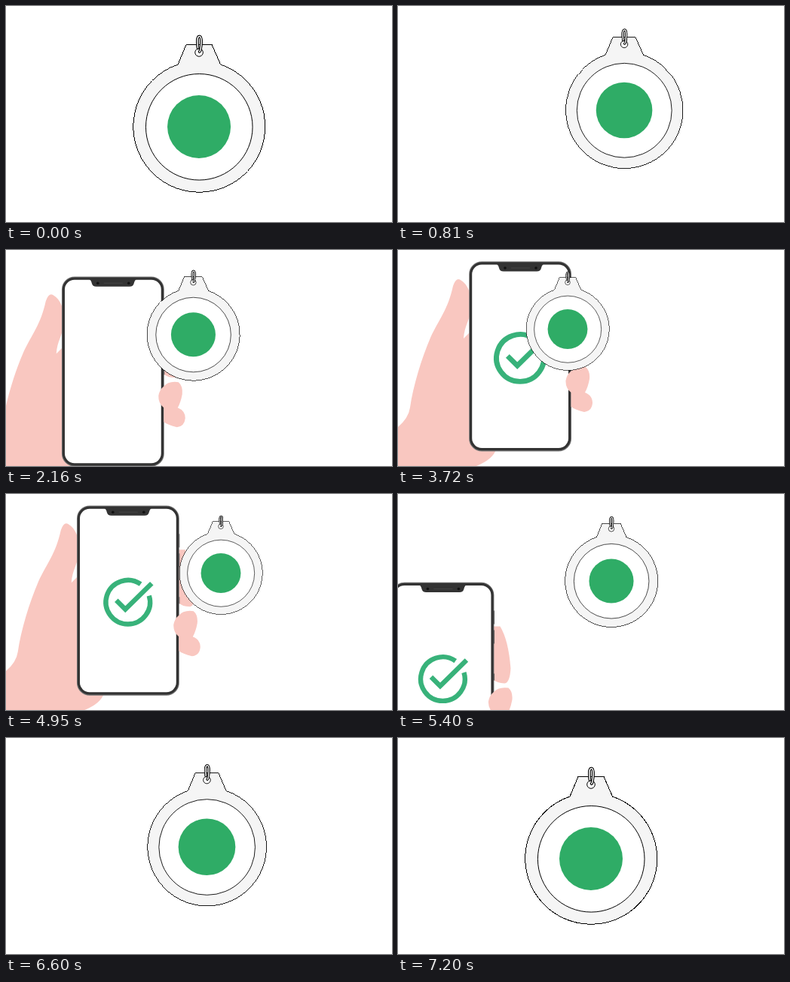
Animation, 512 px wide and 288 px high, one loop 8100 ms. Source, as an HTML page:

```html
<!DOCTYPE html>
<html lang="en">
<head>
<meta charset="utf-8">
<title>Tag and phone</title>
<style>
  html, body { margin: 0; width: 100%; height: 100%; overflow: hidden; background: #fff; }
  svg { display: block; width: 100%; height: 100%; }
</style>
</head>
<body>
<svg viewBox="0 0 512 288">
  <g id="phone">
    <g fill="#f9c7c0">
      <path d="M-310 620 L-60 300 L0 236 Q14 224 16 210 C20 182 31 145 43 117 C55 91 66 80 73 48 Q77 36 83 40 C94 46 98 62 97 78 C96 92 88 101 87 118 L95 110 L130 266 Q126 279 104 288 L0 620 Z"/>
      <path d="M226 74 H238 Q249 92 252 130 Q251 149 244 150 Q234 150 226 143 Z"/>
    </g>
    <path d="M229.5 53 V71 M229.5 79 V97 M229.5 137 V146" stroke="#333" stroke-width="2"/>
    <rect x="95.2" y="16.2" width="133.8" height="251.3" rx="16" fill="#fff" stroke="#777" stroke-width="2"/>
    <rect x="96.6" y="17.8" width="131" height="247.8" rx="14.5" fill="none" stroke="#333" stroke-width="3.2"/>
    <path d="M129 18 H195 Q191 19 190 24 Q189 28.5 184 28.5 H140 Q135 28.5 134 24 Q133 19 129 18 Z" fill="#333"/>
    <g fill="#111"><circle cx="142" cy="24" r="1.8"/><circle cx="183" cy="24" r="1.8"/></g>
    <path d="M150 24 H175" stroke="#444"/>
    <path d="M229 162 Q236 154 249 156 Q255 161 254 172 Q252 183 248 190 Q258 194 258 204 Q257 215 247 216 Q235 213 229.5 209 V190 Q222 184 222.5 174 Q224 166 229 162 Z" fill="#f9c7c0"/>
    <g id="check" fill="none" stroke="#38b27a" stroke-width="6.4">
      <path d="M190 135.4 A29.3 29.3 0 1 1 178.8 120"/>
      <path d="M146.5 141.5 L158.5 153.5 L193.5 119"/>
    </g>
  </g>
  <g id="tag" stroke="#000" fill="#f5f5f5">
    <path d="M-28 -83 L-17 -109.5 H17 L28.5 -83 A87.5 87.5 0 1 1 -28 -83 Z" shape-rendering="crispEdges"/>
    <circle cx=".2" cy=".3" r="70.8" fill="#fff"/>
    <circle r="42" fill="#2fac66" stroke="none"/>
    <circle cy="-99" r="5.3" fill="#fff"/>
    <g id="hook" fill="none" stroke-linecap="round">
      <path id="wire" d="M-1.5 -105 C-2.8 -114 -2.5 -120.5 .6 -120.5 C3.6 -120.5 3.2 -112 2.4 -106 Q2 -101 .6 -100" stroke-width="3.4"/>
      <use href="#wire"/>
      <path d="M-1.5 -105 C-2.8 -114 -2.5 -120.5 .6 -120.5 C3.6 -120.5 3.2 -112 2.4 -106 Q2 -101 .6 -100" stroke="#fff" stroke-width="1.5"/>
    </g>
  </g>
</svg>
<script>
const LOOP = 8100;
const [phone, check, tag] = ['phone', 'check', 'tag'].map(id => document.getElementById(id));

// Each path is a list of [time, x, y]
const approach = [[0, 256, 161], [810, 300, 139], [1180, 326, 127], [1680, 295, 118],
                  [2160, 248.5, 112.8], [2520, 227, 108], [2700, 225, 105.5]];
const retreat = [[4950, 285, 105.5], [5400, 283, 116], [6000, 275.5, 130.5],
                 [6630, 266, 146], [7200, 256, 161]];

function ramp(t, t0, t1, from, to) {
  const u = Math.min(1, Math.max(0, (t - t0) / (t1 - t0)));
  return from + (to - from) * u;
}

// Cubic Hermite curve through the points, slopes taken from the neighbours
function along(points, t) {
  const last = points.length - 1;
  t = Math.min(points[last][0], Math.max(points[0][0], t));
  let i = 0;
  while (i < last - 1 && t > points[i + 1][0]) i++;
  const a = points[i], b = points[i + 1], span = b[0] - a[0], u = (t - a[0]) / span;
  const slope = (k, axis) => {
    const p = points[Math.max(0, k - 1)], q = points[Math.min(last, k + 1)];
    return (q[axis] - p[axis]) / (q[0] - p[0]) * span;
  };
  return [1, 2].map(axis => {
    const w = u * u * (3 - 2 * u);
    return a[axis] * (1 - w) + b[axis] * w
      + slope(i, axis) * u * (1 - u) ** 2 - slope(i + 1, axis) * u * u * (1 - u);
  });
}

function draw(t) {
  const leaving = t >= 4950;
  let [x, y] = along(leaving ? retreat : approach, t);
  if (!leaving) x += ramp(t, 4020, 4500, 0, 60);
  const scale = leaving ? ramp(t, 4950, 7200, 0.629, 1) : ramp(t, 0, 2700, 1, 0.629);
  tag.setAttribute('transform', `translate(${x} ${y}) scale(${scale})`);

  const away = leaving ? ramp(t, 4950, 6300, 0, 307) : ramp(t, 900, 2250, 307, 0);
  phone.setAttribute('transform', `translate(${-away} ${away})`);
  phone.style.display = away > 240 ? 'none' : '';

  const pop = t < 3600 ? ramp(t, 3150, 3600, 0, 1.1) : ramp(t, 3600, 4050, 1.1, 1);
  check.setAttribute('transform', `translate(162 144) scale(${pop}) translate(-162 -144)`);
  check.style.display = pop ? '' : 'none';
}

const start = performance.now();
function tick() {
  draw((performance.now() - start) % LOOP);
  requestAnimationFrame(tick);
}
tick();
</script>
</body>
</html>
```
